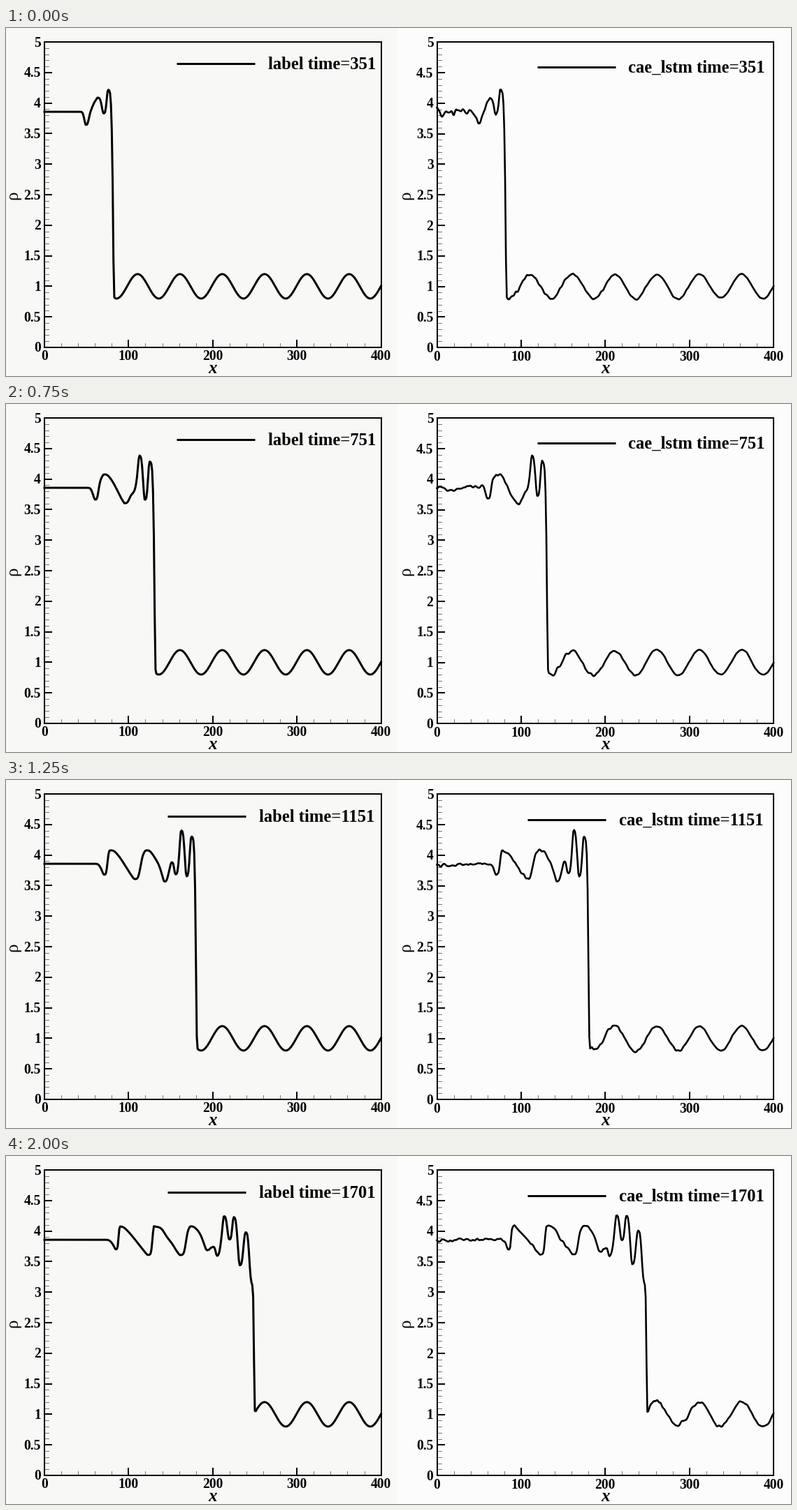
Recreate the animation shown at these times as a matplotlib script. Size 1123 by 499 pixels, loop 2.25 s.

```python
import numpy as np
import matplotlib.pyplot as plt
from matplotlib.animation import FuncAnimation
from matplotlib.patches import Rectangle

W, H, DPI = 1123, 499, 128
PT = 72 / DPI                      # points per pixel
SERIF = "Liberation Serif"
STEPS = [351, 451, 601, 751, 951, 1151, 1301, 1501, 1701]
TAU = 0.000868                     # physical time of one counted step
DX, GHOST, SUB = 0.025, 10, 18
GAMMA = 1.4
GRID = np.arange(401)


# Shock running into a density wave: 1D Euler equations, MUSCL with HLLC
def conserved(prim):
    r, u, p = prim
    return np.array([r, r * u, p / (GAMMA - 1) + r * u * u / 2])


def primitive(cons):
    r, m, e = cons
    return np.array([r, m / r, (GAMMA - 1) * (e - m * m / r / 2)])


def slopes(v):
    d = np.diff(v, axis=1)
    a, b = d[:, :-1], d[:, 1:]
    s = np.sign(a)
    steep = 2 * np.minimum(abs(a), s * b)
    return s * np.maximum(0, np.minimum(steep, s * (a + b) / 2))


def side(prim):
    r, u, p = prim
    cons = conserved(prim)
    flux = np.array([cons[1], cons[1] * u + p, (cons[2] + p) * u])
    return cons, flux, np.sqrt(GAMMA * p / r)


def star(prim, cons, flux, s, mid):
    r, u, p = prim
    energy = cons[2] / r + (mid - u) * (mid + p / (r * (s - u)))
    inner = r * (s - u) / (s - mid) * np.array([np.ones_like(r), mid, energy])
    return flux + s * (inner - cons)


def hllc(lo, hi):
    (ql, fl, cl), (qr, fr, cr) = side(lo), side(hi)
    sl = np.minimum(lo[1] - cl, hi[1] - cr)
    sr = np.maximum(lo[1] + cl, hi[1] + cr)
    ml, mr = lo[0] * (sl - lo[1]), hi[0] * (sr - hi[1])
    mid = (hi[2] - lo[2] + ml * lo[1] - mr * hi[1]) / (ml - mr)
    inner = np.where(mid >= 0, star(lo, ql, fl, sl, mid),
                     star(hi, qr, fr, sr, mid))
    return np.where(sl >= 0, fl, np.where(sr <= 0, fr, inner))


def rate(cons):
    prim = np.pad(primitive(cons), ((0, 0), (2, 2)), mode="edge")
    half, mid = slopes(prim) / 2, prim[:, 1:-1]
    f = hllc((mid + half)[:, :-1], (mid - half)[:, 1:])
    return -np.diff(f, axis=1) / DX


def simulate():
    x = (np.arange(-GHOST, 401 + GHOST) + 1.3) * DX - 5
    behind = x < -4
    q = conserved(np.array([
        np.where(behind, 3.857143, 1 + 0.2 * np.sin(5 * x)),
        np.where(behind, 2.629369, 0.0),
        np.where(behind, 10.33333, 1.0)]))
    dt, out = 50 * TAU / SUB, {}
    for n in range(51, STEPS[-1] + 1, 50):
        for _ in range(SUB):
            q1 = q + dt * rate(q)
            q = (q + q1 + dt * rate(q1)) / 2
        if n in STEPS:
            out[n] = q[0, GHOST:-GHOST].copy()
    return out


def smooth_noise(rng, width):
    kernel = np.hanning(width + 2)[1:-1]
    kernel /= np.sqrt((kernel ** 2).sum())
    return np.convolve(rng.normal(size=GRID.size + width - 1), kernel, "valid")


def predict(n, rho):
    """The solver's curve with the errors of a learned model."""
    rng = np.random.RandomState(n)
    ahead = GRID - 38.7 - 142 * n * TAU
    early = np.exp(-(n - 351) / 250)
    size = np.where(ahead < 0, 0.012 + 0.02 * early,
                    0.004 + 0.016 * np.exp(-np.abs(ahead) / 60))
    return rho + size * (smooth_noise(rng, 5) + smooth_noise(rng, 15))


fig = plt.figure(figsize=(W / DPI, H / DPI), dpi=DPI)
ax = fig.add_axes([0, 0, 1, 1])
ax.set_xlim(0, W)
ax.set_ylim(H, 0)
ax.axis("off")


def line(xs, ys, width, color="black", **kw):
    return ax.plot(xs, ys, color=color, lw=width * PT, **kw)[0]


def text(x, y, s, size, ha="center", va="baseline", **kw):
    kw = {"weight": "bold", **kw}
    return ax.text(x, y, s, fontsize=size * PT, family=SERIF,
                   ha=ha, va=va, color="black", **kw)


class Panel:
    SX, SY = 481.6 / 400, 438 / 5

    def __init__(self, left, bottom, name, width, key_x, key_y):
        self.left, self.bottom, self.name = left, bottom, name
        self.key_x, self.key_y = left + key_x, key_y
        self.draw_axes()
        self.curve = line([], [], width, solid_joinstyle="round")
        self.key = line([], [], 3, solid_capstyle="butt")
        self.title = text(0, 0, "", 24.6, ha="left")

    def px(self, x):
        return self.left + x * self.SX

    def py(self, y):
        return self.bottom - y * self.SY

    def tick(self, x, y, dx, dy, major):
        size, width, color = (10, 2, "black") if major else (6, 1, "#777777")
        line([x, x + dx * size], [y, y + dy * size], width, color)

    def draw_axes(self):
        x0, y0 = self.left, self.bottom
        for i in range(51):
            y, major = self.py(i / 10), i % 5 == 0
            self.tick(x0, y, 1, 0, major)
            if major:
                text(x0 - 5, y + 6.5, f"{i / 10:g}", 19.5, ha="right")
        for i in range(21):
            x, major = self.px(20 * i), i % 5 == 0
            self.tick(x, y0, 0, -1, major)
            if major:
                text(x, y0 + 18.5, str(20 * i), 19.5)
        ax.add_patch(Rectangle((x0, self.py(5)), 400 * self.SX, 5 * self.SY,
                               fill=False, ec="black", lw=2 * PT, zorder=3))
        text(self.px(200), y0 + 37, "x", 25, style="italic")
        text(x0 - 44.5, 240, "ρ", 25, va="center", rotation=90,
             weight="normal")

    def show(self, n, rho):
        self.curve.set_data(self.px(GRID), self.py(rho))
        wide = n > 999
        x, y = self.key_x - 13.5 * wide, self.key_y + 1.5 * wide
        self.key.set_data([x, x + 112], [y, y])
        self.title.set_position((x + 131, y + 8))
        self.title.set_text(f"{self.name} time={n}")


ax.add_patch(Rectangle((0, 0), 560, H, color="#f8f8f6", lw=0, zorder=0))
ax.add_patch(Rectangle((560, 0), W - 560, H, color="#fbfcfb", lw=0, zorder=0))
solver = Panel(55, 458, "label", 3, 189, 50.5)
network = Panel(616.5, 458.2, "cae_lstm", 2.6, 143, 55.5)
density = simulate()


def update(i):
    n = STEPS[i]
    solver.show(n, density[n])
    network.show(n, predict(n, density[n]))
    return []


anim = FuncAnimation(fig, update, frames=len(STEPS), interval=250,
                     repeat=True, repeat_delay=0, blit=False)
plt.show()
```
